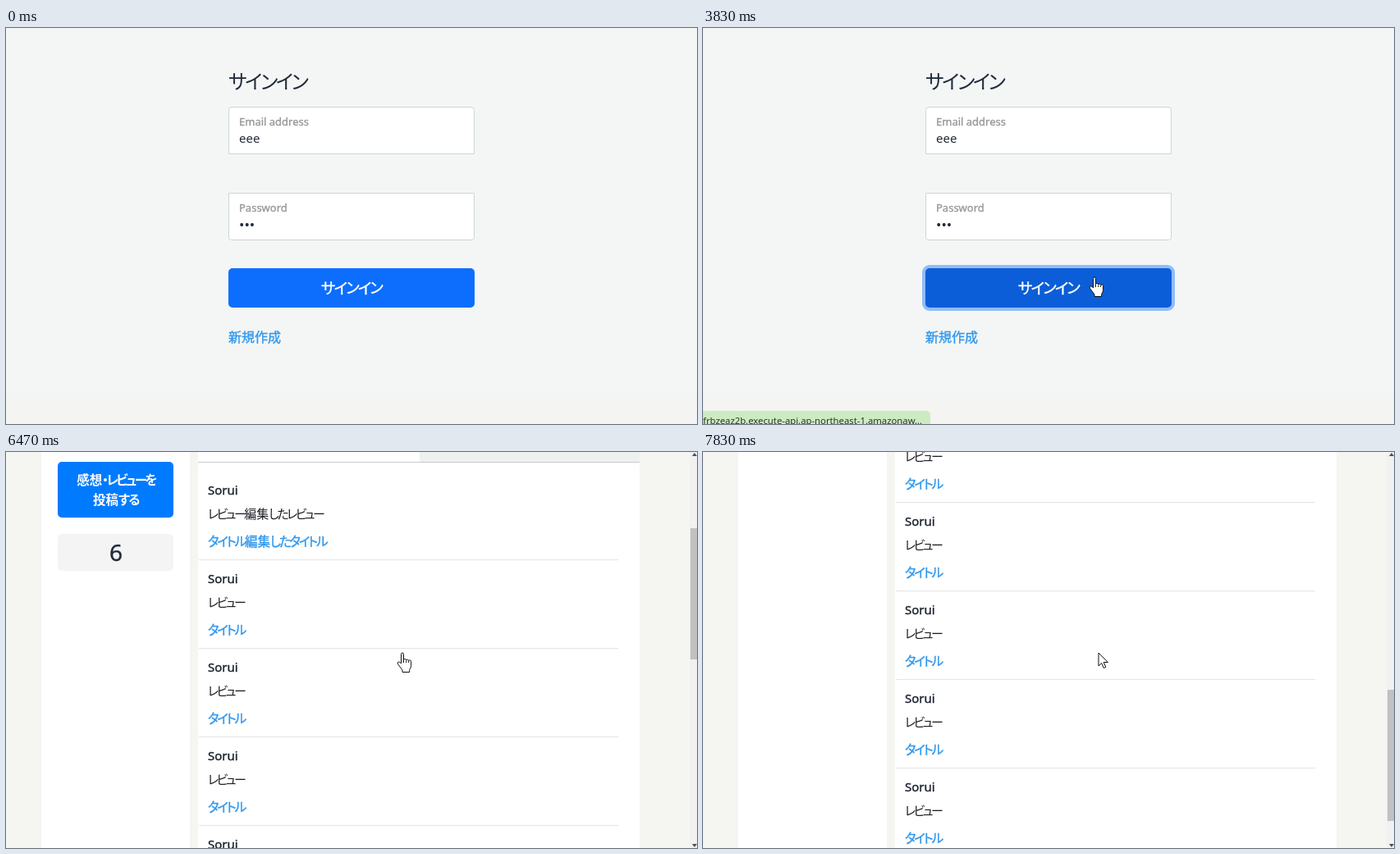
These frames come from a looping animation (842x483 px, 8000 ms). An HTML page:

```html
<!DOCTYPE html>
<html lang="ja">
<head>
<meta charset="utf-8">
<title>書籍レビューアプリ</title>
<style>
html, body { margin: 0; width: 100%; height: 100%; overflow: hidden; }
#stage { position: relative; width: 842px; height: 483px; overflow: hidden; background: #fff;
  color: #212b3a; font-family: "Noto Sans", "Noto Sans CJK JP", sans-serif; }
#stage div, #stage svg { position: absolute; box-sizing: border-box; }
.t { white-space: nowrap; line-height: 40px; height: 40px; }
.mid { transform: translateX(-50%); }
.k { font-feature-settings: "palt"; letter-spacing: var(--k, -.1em); }
.medium { -webkit-text-stroke: .4px currentColor; }
.field { border: 1px solid #ced4da; background: #fff; }
.label { color: #9a9b9b; }
.white { color: #fff; }
.logo { --k: 0; color: #5fbd48; -webkit-text-stroke: 1.8px #5fbd48; stroke-linejoin: round; }
.link { color: #3399ec; }
svg { overflow: visible; }
</style>
</head>
<body>
<div id="stage"></div>
<script>
const kana = s => s.replace(/[ぁ-んァ-ヶー・]+/g, m => `<span class="k">${m}</span>`);
const box = (x, y, w, h, css = '', inner = '', attrs = '') =>
  `<div ${attrs} style="left:${x}px;top:${y}px;width:${w}px;height:${h}px;${css}">${inner}</div>`;
// x: left edge (or centre with class "mid"), y: vertical centre
const text = (x, y, size, s, cls = '', css = '') =>
  `<div class="t ${cls}" style="left:${x}px;top:${y - 20}px;font-size:${size}px;${css}">${kana(s)}</div>`;
const svg = (x, y, w, h, viewBox, inner, attrs = '') =>
  `<svg ${attrs} style="left:${x}px;top:${y}px" width="${w}" height="${h}" viewBox="${viewBox}">${inner}</svg>`;

const person = `
  <path d="M6 36Q0 42 2 62Q24 67 45 62Q49 44 40 36Z" fill="#168c92"/>
  <path d="M6 12H42V26Q40 39 24 39Q8 39 6 27Z" fill="#f0cdb0"/>
  <path d="M6 12H42V24H6Z" fill="#8fa6c4"/>
  <path d="M6 24H42V29H6Z" fill="#c3b9bd"/>
  <path d="M3 21L1 9L6 10L8 2L14 4L20 0L25 3L35 1L37 6L44 7L43 13L47 16L43 22L39 14L31 15L27 11L18 15L10 13L7 22Z" fill="#252a2c"/>
  <path d="M12 19L19 21M36 19L29 21" stroke="#252a2c" stroke-width="1.6"/>
  <circle cx="17" cy="24" r="1.5"/><circle cx="31" cy="24" r="1.5"/>
  <path d="M16 32L19 30L22 32L25 30L28 32L31 30" fill="none" stroke="#b3493d" stroke-width="1.6"/>
  <path d="M5 47Q24 57 42 46M8 55Q26 55 40 42" fill="none" stroke="#0b6268" stroke-width="1.5"/>
  <path d="M5 44L12 41L13 46L7 49ZM36 40L43 43L41 48L35 45Z" fill="#f0cdb0"/>`;
const avatar = (x, y, w, h) => svg(x, y, w, h, '0 0 48 65', person, 'class="avatar" preserveAspectRatio="none"');

const signIn = () => box(0, 0, 842, 483, 'background:#f4f6f5',
  box(0, 445, 842, 38, 'background:#f4f4f2') +
  text(271, 65, 24, 'サインイン') +
  box(271, 96, 300, 58, 'border-radius:4px 4px 0 0', '', 'class="field"') +
  text(284, 114, 13, 'Email address', 'label medium') +
  text(284, 134, 15, 'eee') +
  box(271, 201, 300, 58, 'border-radius:0 0 4px 4px', '', 'class="field"') +
  text(284, 219, 13, 'Password', 'label medium') +
  text(284, 240, 17, '•••') +
  box(271, 293, 300, 48, 'border-radius:5px', '', 'id="button"') +
  text(421, 317, 18.6, 'サインイン', 'mid white medium') +
  text(271, 377, 16, '新規作成', 'link medium'),
  'id="signIn"');

const item = (i, review, title) => box(0, i * 108, 833, 0, '',
  text(246, 298, 15, 'Sorui', 'medium', 'color:#1c2430') +
  text(246, 327, 15, review, '', '--k:-.17em;color:#1c1f24') +
  text(246, 361, 15.5, title, 'link medium', '--k:-.14em') +
  box(235, 383, 511, 1, 'background:#e3e4e6'));

const items = Array.from({ length: 11 }, (_, i) =>
  i ? item(i, 'レビュー', 'タイトル') : item(0, 'レビュー編集したレビュー', 'タイトル編集したタイトル')).join('');

const home = () => box(0, 0, 842, 483, 'background:#f5f6f1;overflow:hidden', box(0, 0, 842, 1400, '',
  box(0, 0, 842, 34, 'background:#569709') +
  avatar(617, 0, 22, 28) +
  text(643, 13, 15, 'tefuさん', 'white', 'font-weight:700') +
  box(727, -6, 100, 33, 'border:1px solid #9cc36c') +
  text(746, 13, 14.5, 'メニュー', 'white medium', '--k:-.14em') +
  text(797, 13, 9, '▼', 'white') +
  box(0, 34, 842, 100, 'background:#fff') +
  text(13, 71, 35, '書籍レビュー', 'logo') +
  text(66, 101, 35, 'アプリ', 'logo') +
  box(253, 54, 200, 44, 'border-radius:22px;background:#fff;box-shadow:0 0 6px #d4d4d4') +
  svg(421, 62, 24, 24, '0 0 24 24',
    '<g fill="none" stroke="#ccc"><circle cx="9.7" cy="9.7" r="7.6" stroke-width="4"/><path d="M15.5 15.5L22.3 22.3" stroke-width="5"/></g>') +
  box(43, 154, 181, 1246, 'background:#fff;border-radius:4px') +
  avatar(76, 176, 48, 65) +
  text(143, 207, 17, 'tefu', 'medium') +
  box(63, 264, 141, 68, 'background:#007bff;border-radius:5px') +
  text(134, 286, 15.5, '感想・レビューを', 'mid white', '--k:-.16em;font-weight:700') +
  text(134, 310, 15.5, '投稿する', 'mid white', 'font-weight:700') +
  box(63, 352, 141, 45, 'background:#f4f4f4;border-radius:5px') +
  text(134, 374, 28, '<span id="count"></span>', 'mid medium') +
  box(234, 154, 538, 1246, 'background:#fff') +
  text(245, 179, 20, '感想・レビュー', 'medium', '--k:-.15em') +
  box(504, 220, 268, 44, 'background:#eff0f0') +
  box(234, 264, 538, 1, 'background:#c9cacb') +
  text(369, 242, 15.5, 'みんなの感想', 'mid medium', 'color:#111') +
  text(638, 242, 15.5, 'あなたの感想', 'mid medium', 'color:#111') +
  box(0, 0, 833, 0, '', items, 'id="items"'), 'id="scroller"') +
  box(833, 0, 9, 483, 'background:#f1f1f1',
    box(1, 11, 8, 160, 'background:#c1c1c1', '', 'id="thumb"') +
    svg(0, 0, 9, 483, '0 0 9 483', '<path d="M3 5L6 1L9 5ZM3 478L6 482L9 478Z" fill="#505050"/>'),
    'id="bar"'), 'id="home"');

const cursors = {
  arrow: '<path d="M0 0V16L3.7 12.5L6.3 18.5L8.8 17.4L6.2 11.5H11.3Z"/>',
  hand: '<path d="M-1.5 13V1.5Q-1.5 0 0 0T1.5 1.5V8.5Q1.8 7.5 3.2 7.5T4.7 9Q5 8.2 6.3 8.2T7.7 9.6Q8 8.9 9.2 8.9T10.6 10.6V15.5Q10.6 18 8.7 20.5V23.5H0V21L-5.4 13.8Q-6.4 11.2 -4.5 10.9Q-3 11 -1.5 13Z"/><path d="M1.5 8.5V12M4.7 9.5V12M7.7 10V12"/>'
};

const stage = document.getElementById('stage');
stage.innerHTML = signIn() + home() +
  box(0, 467, 277, 16, 'background:#cdebc0;border-radius:0 5px 0 0;overflow:hidden',
    text(0, 12, 11.3, 'frbzeaz2b.execute-api.ap-northeast-1.amazonaw...', '', 'color:#333'), 'id="bubble"') +
  svg(0, 0, 1, 1, '0 0 1 1', Object.entries(cursors).map(([name, d]) =>
    `<g id="${name}" fill="#fff" stroke="#111" stroke-linejoin="round">${d}</g>`).join(''));
const el = id => document.getElementById(id);
const avatars = document.querySelectorAll('.avatar');
const display = (node, on) => { node.style.display = on ? '' : 'none'; };

// Step tables: time first, then the values held from there on
const pointer = [
  [0, -50, -50, 'arrow'],
  [540, 697, 421, 'arrow'], [610, 655, 392, 'arrow'], [680, 600, 353, 'arrow'], [750, 550, 318, 'hand'],
  [820, 515, 298, 'hand'], [880, 490, 286, 'arrow'], [950, 480, 283, 'arrow'],
  [1150, 479, 285, 'arrow'], [1220, 478, 291, 'arrow'], [1300, 478, 297, 'hand'], [1400, 477, 302, 'hand'],
  [1490, 477, 304, 'hand'], [4190, 477, 304, 'arrow'],
  [5180, 480, 301, 'arrow'], [5250, 492, 295, 'arrow'], [5320, 506, 288, 'arrow'], [5390, 510, 279, 'arrow'],
  [5460, 502, 263, 'hand'], [5530, 490, 251, 'hand'], [5600, 483, 245, 'hand'], [6610, 482, 245, 'arrow']
];
const hover = [[0, 0], [750, .3], [820, .9], [880, .6], [950, 0], [1300, .5], [1400, 1]];
const ring = [[0, 0], [1820, .3], [1890, .7], [1960, .9], [2030, 1]];
const scroll = [
  [0, 0], [6260, 30], [6330, 120], [6400, 200], [6470, 252], [6540, 278], [6610, 287],
  [6940, 395], [7010, 481], [7080, 530], [7150, 555], [7220, 569], [7290, 574],
  [7550, 664], [7620, 754], [7690, 814], [7760, 846], [7830, 862]
];
const at = (table, t) => table.findLast(row => row[0] <= t);
const mix = (a, b, k) => `rgb(${a.map((v, i) => Math.round(v + (b[i] - v) * k))})`;

function draw(t) {
  display(el('signIn'), t < 3900);
  display(el('home'), t >= 3960);
  display(el('bubble'), t >= 3830 && t < 3960);
  display(el('items'), t >= 4110);
  display(el('bar'), t >= 4110);
  avatars.forEach(node => display(node, t >= 4190));

  const button = el('button').style;
  button.background = mix([13, 110, 253], [11, 94, 215], at(hover, t)[1]);
  const r = at(ring, t)[1];
  button.boxShadow = `0 0 0 ${4 * r}px rgba(49,132,253,${.5 * r})`;

  el('count').textContent = t < 5320 ? '0' : '6';
  const y = at(scroll, t)[1];
  el('scroller').style.top = -y + 'px';
  el('thumb').style.top = Math.round(11 + y * .324) + 'px';

  const [, x, top, shape] = at(pointer, t);
  for (const name in cursors) {
    display(el(name), name === shape);
    el(name).setAttribute('transform', `translate(${x} ${top})`);
  }
}

const start = performance.now();
function tick() {
  draw((performance.now() - start) % 8000);
  requestAnimationFrame(tick);
}
tick();
</script>
</body>
</html>
```
